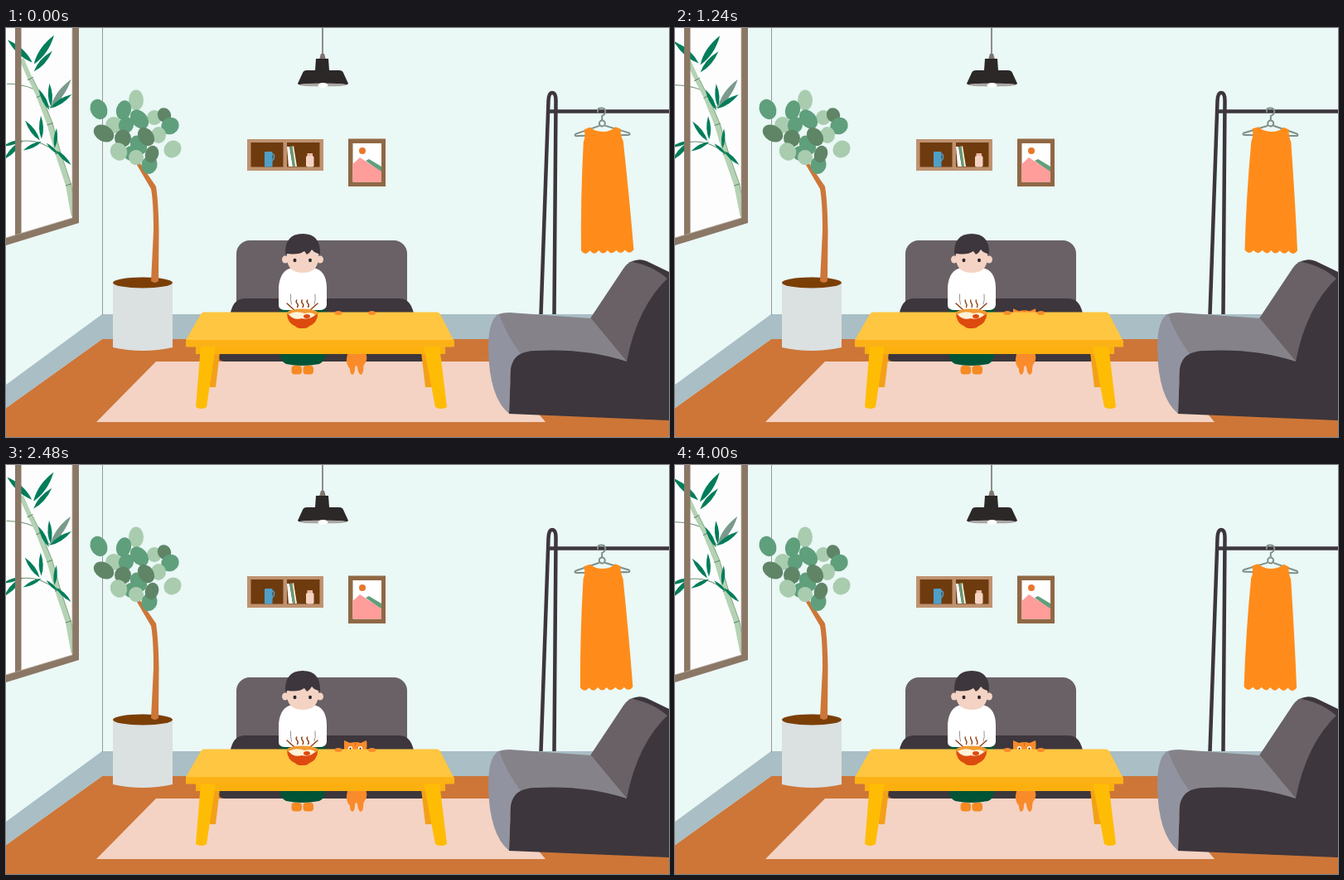
An HTML page with a canvas that plays this animation: 800 px wide and 493 px high, repeating every 4.04 s.

```html
<!DOCTYPE html>
<html lang="en">
<head>
<meta charset="utf-8">
<title>Living room</title>
<style>
html, body { margin: 0; width: 100%; height: 100%; overflow: hidden; background: #eaf8f6; }
canvas { display: block; }
</style>
</head>
<body>
<canvas id="stage" width="800" height="493"></canvas>
<script>
const ctx = document.getElementById('stage').getContext('2d');
const LOOP = 4040, STEP = 40, SWING = 836, TAU = Math.PI * 2;
const WALL = '#eaf8f6', DARK = '#3d363c', SOFA = '#696166', WOOD = '#cd7638';
const SKIN = '#f4d3c4', ORANGE = '#ff8c1a', CAT = '#f98b2b';
const GREEN = '#007d5a', PALE = '#b5d3b4', PANTS = '#025436';

function fill(color, d) {
  ctx.fillStyle = color;
  ctx.fill(new Path2D(d));
}

function line(color, width, d, cap = 'round') {
  ctx.strokeStyle = color;
  ctx.lineWidth = width;
  ctx.lineCap = cap;
  ctx.lineJoin = 'round';
  ctx.stroke(new Path2D(d));
}

function oval(color, x, y, rx, ry = rx, deg = 0) {
  ctx.fillStyle = color;
  ctx.beginPath();
  ctx.ellipse(x, y, rx, ry, deg * Math.PI / 180, 0, TAU);
  ctx.fill();
}

function rect(color, x, y, w, h, r = 0) {
  ctx.fillStyle = color;
  ctx.beginPath();
  ctx.roundRect(x, y, w, h, r);
  ctx.fill();
}

function turned(x, y, deg, draw) {
  ctx.save();
  ctx.translate(x, y);
  ctx.rotate(deg * Math.PI / 180);
  ctx.translate(-x, -y);
  draw();
  ctx.restore();
}

// Pointed leaf from its stem (x, y) to its tip (u, v)
function blade(x, y, u, v, color = GREEN) {
  const dx = u - x, dy = v - y;
  const bend = s => `${x + dx * 0.45 - dy * s} ${y + dy * 0.45 + dx * s}`;
  fill(color, `M${x} ${y}Q${bend(0.18)} ${u} ${v}Q${bend(-0.18)} ${x} ${y}Z`);
}

function room() {
  rect(WALL, 0, 0, 800, 493);
  fill(WOOD, 'M0 458L116 375H800V493H0Z');
  fill('#a9bec5', 'M0 430L116 345H800V375H116L0 458Z');
  line('#969996', 1, 'M116.5 0V346', 'butt');
  fill(SKIN, 'M181 402H590L651 475H109Z');
}

function bamboo() {
  line('#6d8f74', 1, 'M0 68Q18 68 32 74M18 137Q40 134 60 150M36 82L52 96L66 84');
  line(PALE, 7, 'M82 226L75 189L62 151L52 116L39 83', 'butt');
  line(PALE, 5.5, 'M40 86L28 62L17 38', 'butt');
  line('#87ad8c', 1, 'M85 225L78 188L65 150L55 115L41 82L31 62');
  line('#638b6d', 1.1, 'M72 190L78 188M59 152L65 150M49 117L55 115M36 84L42 81M25 63L31 60');
  blade(32, 44, 56, 9);
  blade(32, 53, 54, 28);
  blade(30, 42, 0, 15);
  blade(53, 95, 77, 62, '#7a9a8c');
  blade(52, 97, 78, 80);
  blade(51, 99, 38, 74);
  blade(53, 95, 51, 67);
  blade(42, 134, 41, 106);
  blade(40, 136, 22, 112);
  blade(42, 137, 20, 148);
  blade(19, 136, -3, 159);
  blade(18, 136, -4, 143);
  blade(60, 148, 78, 165);
  blade(58, 145, 60, 121);
  blade(62, 152, 48, 139);
}

function windowPane(sway) {
  fill('#8b7765', 'M0 0H88V235L0 262Z');
  ctx.save();
  ctx.clip(new Path2D('M0 0H80V229L0 253Z'));
  rect('#fdfdfd', 0, 0, 80, 260);
  turned(82, 228, sway * 0.9, bamboo);
  ctx.restore();
  fill('#8b7765', 'M11 0H18.500V253L11 257Z');
  line('#b3a596', 0.8, 'M80 0V229L0 253', 'butt');
}

function plant() {
  fill('#dbe0e1', 'M129 307H201V385Q165 393 129 385Z');
  oval('#dbe0e1', 165, 307.500, 36, 7.500);
  oval('#7b3f06', 165, 307, 36, 6.500);
  fill(WOOD, 'M155 160L159 159L181 191Q184 210 184.500 245L184 305Q180 309 175 305L178 245Q178 210 175 194Z');
  const light = '#a9ccaf', mid = '#5f9f7c', deep = '#5f8566';
  [
    [112, 98, 10, 12.5, -25, mid], [157, 87, 9, 12.5, 0, light],
    [142, 99, 9, 12, 15, mid], [179, 108, 9, 9, 0, light],
    [191, 105, 8, 9, -25, deep], [198, 118, 10, 11, 60, mid],
    [130, 117, 10, 10, 0, light], [118, 127, 9.5, 13, -60, deep],
    [145, 117, 9, 10, 20, mid], [161, 110, 9.5, 13, -40, mid],
    [141, 133, 10, 10.5, 0, deep], [184, 129, 9, 10, 0, light],
    [151, 151, 9, 9, 0, mid], [136, 149, 10, 11, -30, light],
    [160, 141, 9.5, 12, -30, mid], [169, 131, 9, 12, -35, deep],
    [157, 156, 9, 9, 20, light], [201, 146, 10, 11, 45, light],
    [173, 165, 9.5, 11, 15, mid], [176, 152, 8, 10.5, 20, deep]
  ].forEach(([x, y, rx, ry, deg, color]) => oval(color, x, y, rx, ry, deg));
}

function lamp() {
  line('#6f6b69', 1.5, 'M382 0V33', 'butt');
  fill('#80766f', 'M380 31H384L386 38H378Z');
  fill('#2b2827', 'M374 37H389L390 51H402Q406 51 407 54L413 67Q412 70 382 70Q353 70 352 67L358 54Q359 51 363 51H373Z');
  oval('#aaa6a3', 382.500, 68.500, 29, 2);
  oval('#fff', 382.500, 69, 6, 3);
}

function wallThings() {
  rect('#bf9270', 291, 134, 92, 38);
  rect('#6e3b0e', 295.500, 138, 39, 29.500);
  rect('#6e3b0e', 339, 138, 39.500, 29.500);
  line('#4f9fc8', 1.5, 'M321 152Q325 152 323 158L320 161');
  rect('#4f9fc8', 312, 149, 9.500, 18.500, 1);
  fill('#fff', 'M339 143H342L346 167H341Z');
  fill('#5f9f7c', 'M342.500 143L345 142L349 167H346Z');
  fill('#f8f3df', 'M345.500 143L347 142L351 167H349Z');
  rect(SKIN, 362, 154, 9.500, 13.500, 2);
  rect('#e9b9a5', 363.500, 151, 6.500, 3);

  rect('#8f6845', 413, 133.500, 45, 57.500);
  rect('#fff', 418.500, 139, 34.500, 46.500);
  oval('#e9762f', 430, 148, 4);
  fill('#5f9f7c', 'M434 160L438 158L453 167V174Z');
  fill('#ff9d9a', 'M418.500 164L427 156L453 173V185.500H418.500Z');
}

function sofa() {
  rect(SOFA, 278, 256, 206, 95, 16);
  fill(DARK, 'M270 350Q272 326 288 326H475Q490 326 493 350L507 393Q507 402 500 402H264Q256 402 256 393Z');
}

function person() {
  for (const x of [344.5, 358.5]) {
    rect(SKIN, x + 2, 402, 9, 7);
    rect('#f58a23', x, 407, 12.5, 10.5, 4);
  }
  fill(PANTS, 'M331 391H385Q386 401 378 405Q357 409 338 405Q330 401 331 391Z');
  rect(PANTS, 331, 334, 54, 10, 3);
  fill('#fff', 'M346 289H370Q386 291 387 312V334Q386 340 378 340H338Q329 340 329 334V312Q331 291 346 289Z');
  line('#77777b', 0.8, 'M343.500 321Q343 328 344.500 333M373 321Q374 328 372 333');
  oval(SKIN, 337, 279, 4, 4.500);
  oval(SKIN, 379, 279, 4, 4.500);
  fill(SKIN, 'M339 266H377V278Q376 295 358 295Q340 295 339 278Z');
  fill(DARK, 'M337 273Q336 248 358 248Q380 248 379 273L372 270L369 267Q367 271 363 273L360 269Q353 274 340 272Z');
  oval('#2b2a2e', 348.5, 280, 2, 2.2);
  oval('#2b2a2e', 367, 280, 2, 2.2);
}

function catBody() {
  fill(CAT, 'M413 389H433Q437 397 434 403Q431 406 431 412Q431 417 428 418Q425 417 424 409Q423 405 421 409Q421 417 418 418Q415 417 415 411Q410 405 411 398Z');
}

function catHead(drop) {
  ctx.save();
  ctx.beginPath();
  ctx.rect(390, 300, 70, 43.5);
  ctx.clip();
  ctx.translate(0, drop);
  fill(CAT, 'M408 332L415 335Q422 333 428 335L435 332Q436 338 435 343Q437 355 422 356Q407 355 408 343Z');
  for (const x of [415.5, 427.5]) {
    oval('#fff', x, 342, 2.6, 3);
    oval('#3a2418', x, 342, 1.1, 1.5);
  }
  line('#d96516', 1, 'M421.500 335V338');
  ctx.restore();
}

function table() {
  fill('#f3a019', 'M246 391H258L253 433H246ZM501 391H512L514 433H506Z');
  rect('#fbb00f', 229, 383, 301, 10);
  fill('#ffbc05', 'M235 383H253L242 457Q236 461 229 457ZM504 383H523L532 457Q525 461 518 457Z');
  fill('#fec641', 'M239 342.500H520Q523 342.500 524 345L540 376H217L235 345Q236 342.500 239 342.500Z');
  rect('#fcb216', 217, 376, 324, 8.5, 1);
  oval(CAT, 401, 343.5, 4.5, 2.5);
  oval(CAT, 441.5, 343.5, 4.5, 2.5);
}

function bowl(sway) {
  line('#8c3c10', 1.4, 'M339 332L348 340M376 332L367 340');
  fill('#dd4a0f', 'M339 343H376.500Q376 356 365 360Q364 362 357 362Q351 362 350 360Q339 356 339 343Z');
  oval('#f29a32', 357.7, 343.5, 18.7, 5);
  fill('#fff3d9', 'M341 345Q350 340 360 344Q370 342 373 346Q366 352 357 350Q347 353 341 345Z');
  oval('#dd4a0f', 363, 347.5, 4, 2.5);
  const s = sway * 0.5;
  for (const x of [350.5, 357, 363.5])
    line('#8e3e12', 1.4, `M${x + 1} 336.5Q${x + 2.5 + s} 334 ${x + 0.8} 332Q${x - 1 - s} 330 ${x + s} 328`);
}

function rack() {
  line(DARK, 4.5, 'M645.500 345L654.500 88Q655 78 659 78Q663.500 78 663.500 88L661.500 345', 'butt');
  line(DARK, 4.5, 'M655 100.500H800', 'butt');
}

function dress() {
  line('#7f9089', 2, 'M714 101Q713 96 719 96.500Q724 97 723 102Q722 105 719 106V111M715 118L687 127Q684 130 690 129.500H748Q754 130 751 127L723 118');
  oval('#7f9089', 719, 115, 4.5);
  oval(WALL, 719, 115, 2.5);
  let d = 'M697 122L704 119.500Q711 125 720 125Q729 125 735 119.500L741 122Q741 131 744 137Q750 205 754 268';
  const hem = 63.5 / 6;
  for (let i = 0; i < 6; i++) d += `q${-hem / 2} 7 ${-hem} 0`;
  fill(ORANGE, d + 'Q691 205 696 137Q699 131 697 122Z');
}

function armchair() {
  fill(SOFA, 'M705 350L745 290Q753 278 765 280L800 300L770 402H749Z');
  fill('#858389', 'M592 346Q598 343 608 343L706 350L750 403L640 392L612 415Z');
  fill('#9193a0', 'M595 345Q582 350 582 387Q583 445 607 465L609 410Q612 397 621 393Q604 370 595 345Z');
  fill(DARK, 'M607 465L609 411Q612 389 640 389Q700 386 749 402Q762 335 800 300V473Z');
  fill(DARK, 'M756 282Q763 277 773 281L800 294V304Q782 287 756 282Z');
}

function draw(t) {
  const sway = Math.cos(TAU * (t - 125) / SWING);
  const k = Math.min(1, Math.max(0, (t - 1000) / 450));
  const rise = k * k * (3 - 2 * k);
  room();
  windowPane(sway);
  plant();
  lamp();
  wallThings();
  sofa();
  person();
  catBody();
  catHead(14 * (1 - rise));
  table();
  bowl(sway);
  rack();
  turned(719, 99, -sway * 2, dress);
  armchair();
}

const start = performance.now();
function tick() {
  const t = (performance.now() - start) % LOOP;
  draw(Math.floor(t / STEP) * STEP);
  requestAnimationFrame(tick);
}
tick();
</script>
</body>
</html>
```
